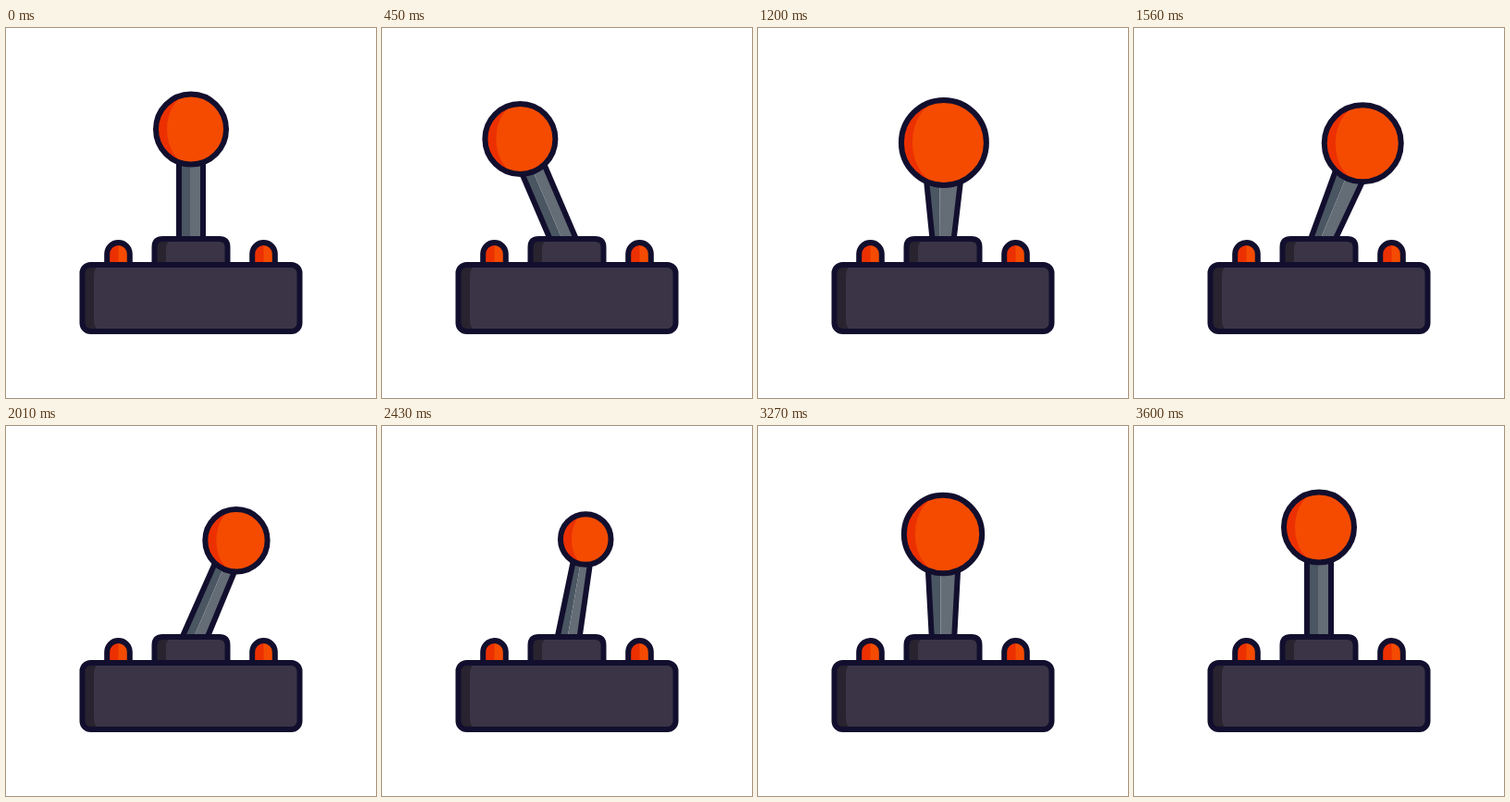
An HTML page for the animation above (5630 ms loop, 400 by 400 pixels).

```html
<!DOCTYPE html>
<html lang="en">
<head>
<meta charset="utf-8">
<title>Joystick</title>
<style>
  html, body { margin: 0; width: 100%; height: 100%; overflow: hidden; background: #fff; }
  svg { display: block; width: 100%; height: 100%; }
  .line { fill: none; stroke: #120f2e; stroke-width: 6; stroke-linejoin: round; stroke-linecap: round; }
  .body { fill: #3b3446; }
  .shade { fill: #28232f; }
  .hot { fill: #f44b00; }
  .deep { fill: #ec3000; }
</style>
</head>
<body>
<svg viewBox="0 0 400 400">
  <defs>
    <g id="button">
      <path class="hot" d="M-12 256V244A12 12 0 0 1 12 244V256Z"/>
      <path class="deep" d="M-12 256V244A12 12 0 0 1 0 232V256Z"/>
      <path class="line" d="M-12.3 256V244.3A12.3 12.3 0 0 1 12.3 244.3V256"/>
    </g>
  </defs>

  <g id="stick">
    <path id="dark" fill="#4a5662"/>
    <path id="light" fill="#646c76"/>
    <path id="edge" class="line"/>
  </g>

  <rect class="body" x="160.5" y="228" width="79" height="40" rx="9"/>
  <path class="shade" d="M161 256V237Q161 228 170 228H182Q173 229 173 239V256Z"/>
  <path class="line" d="M160.5 256V237Q160.5 228 169.5 228H230.5Q239.5 228 239.5 237V256"/>

  <use href="#button" x="121.5"/>
  <use href="#button" x="278.5"/>

  <rect class="body" x="82.5" y="256" width="235" height="72" rx="9"/>
  <path class="shade" d="M83 265Q83 256 92 256H105Q95 257 95 268V316Q95 327 105 328H92Q83 328 83 319Z"/>
  <rect class="line" x="82.5" y="256" width="235" height="72" rx="9"/>

  <g id="ball">
    <circle id="disc" class="deep"/>
    <path id="glow" class="hot"/>
    <circle id="ring" class="line"/>
  </g>
</svg>
<script>
const LOOP = 5630, STEP = 30;
const PIVOT = { x: 200, y: 238 }, LENGTH = 128.5, REACH = 54;
const $ = id => document.getElementById(id);
const rad = deg => deg * Math.PI / 180;
const clamp = p => Math.min(1, Math.max(0, p));
const ease = p => p < .5 ? 4 * p ** 3 : 1 - 4 * (1 - p) ** 3;
const swing = p => (1 - Math.cos(Math.PI * p)) / 2;
const span = (t, a, b) => clamp((t - a) / (b - a));

// Sweep of the lever: time in ms, heading in degrees (0 is towards the viewer).
const SWEEP = [[600, -90], [1194, 0], [1560, 61], [1770, 90], [2430, 158], [2560, 180]];

function heading(t) {
  const slope = i => {
    const a = SWEEP[Math.max(0, i - 1)], b = SWEEP[Math.min(SWEEP.length - 1, i + 1)];
    return (b[1] - a[1]) / (b[0] - a[0]);
  };
  let i = 0;
  while (i < SWEEP.length - 2 && t >= SWEEP[i + 1][0]) i++;
  const [t0, a] = SWEEP[i], [t1, b] = SWEEP[i + 1];
  const d = t1 - t0, p = clamp((t - t0) / d), q = 1 - p;
  return a * q * q * (1 + 2 * p) + b * p * p * (3 - 2 * p)
    + d * p * q * (slope(i) * q - slope(i + 1) * p);
}

// Tilt to the side (u) and towards the viewer (v), both -1 to 1.
function tilt(t) {
  if (t < 600) return [-ease(t / 600), 0];
  if (t < 2560) {
    const h = rad(heading(t));
    return [Math.sin(h), Math.cos(h)];
  }
  if (t < 2970) return [0, 2 * swing(span(t, 2560, 2970)) - 1];
  return [0, 1 - ease(span(t, 2970, 3600))];
}

function draw(t) {
  const [u, v] = tilt(t);
  const front = Math.max(0, v) ** 1.15, back = Math.max(0, -v) ** 1.15;
  const dx = REACH * u;
  const x = PIVOT.x + dx;
  const y = PIVOT.y - Math.sqrt(LENGTH ** 2 - dx ** 2) + 14.4 * front + 12.4 * back;
  const r = 41 + 8 * front - 11.7 * back;

  const rim = r - 3, bulge = r - 15;
  $('ball').setAttribute('transform', `translate(${x} ${y})`);
  $('disc').setAttribute('r', rim);
  $('ring').setAttribute('r', rim);
  $('glow').setAttribute('d',
    `M0 ${-rim}A${rim} ${rim} 0 0 1 0 ${rim}A${bulge} ${rim} 0 0 1 0 ${-rim}Z`);

  const len = Math.hypot(x - PIVOT.x, y - PIVOT.y);
  const angle = Math.atan2(x - PIVOT.x, PIVOT.y - y) * 180 / Math.PI;
  const top = 13 + 10 * front - 5 * back;
  const foot = 13 - 2.5 * front - back;
  const seam = -1 - 3 * front;
  $('stick').setAttribute('transform', `translate(${PIVOT.x} ${PIVOT.y}) rotate(${angle})`);
  $('dark').setAttribute('d', `M${-foot} 0L${-top} ${-len}H${seam}V0Z`);
  $('light').setAttribute('d', `M${seam} 0V${-len}H${top}L${foot} 0Z`);
  $('edge').setAttribute('d', `M${-foot} 0L${-top} ${-len}M${foot} 0L${top} ${-len}`);
}

const start = performance.now();
function tick() {
  const t = (performance.now() - start) % LOOP;
  draw(Math.floor(t / STEP) * STEP);
  requestAnimationFrame(tick);
}
tick();
</script>
</body>
</html>
```
